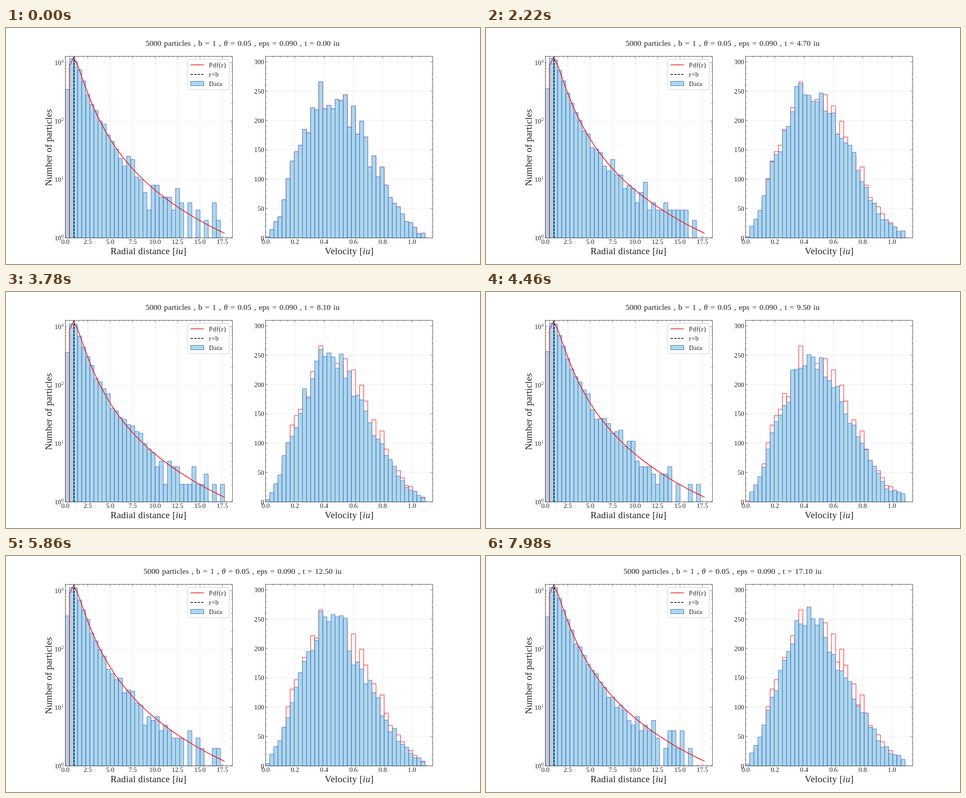
Animation of 1058 by 529 pixels, one loop 8000 ms. Source, as an HTML page:

```html
<!DOCTYPE html>
<html lang="en">
<head>
<meta charset="utf-8">
<title>Particle histograms</title>
<style>
  html, body { margin: 0; width: 100%; height: 100%; overflow: hidden; background: #fff; }
  svg { display: block; width: 100vw; height: 100vh; }
  text { font-family: "Liberation Serif", serif; font-size: 14.6px; fill: #222; }
  .mid { text-anchor: middle; }
  .end { text-anchor: end; }
  .title { font-size: 17.6px; word-spacing: 1.8px; }
  .label { font-size: 21px; letter-spacing: .25px; }
  .key { letter-spacing: .6px; }
  .sup { font-size: 10.2px; }
  .it { font-style: italic; }
  path, rect { fill: none; }
  .grid { stroke: #000; stroke-opacity: .1; stroke-width: .8; }
  .tick { stroke: #000; stroke-width: .6; }
  .spine { stroke: #000; stroke-width: .7; }
  .bars { fill: #add8e6; stroke: #4169e1; }
  .start { stroke: #f00; }
  .pdf { stroke: #f00; stroke-width: 1.5; stroke-linejoin: round; }
  .dash { stroke: #000; stroke-width: 1.6; stroke-dasharray: 5.5 2.4; }
  .box { fill: #fff; fill-opacity: .8; stroke: #ccc; }
</style>
</head>
<body>
<svg id="stage" viewBox="0 0 1058 529"></svg>
<script>
const stage = document.getElementById('stage');
const LOOP = 8000, BINS = 39, COUNT = 5000;
const TOP = 63.5, BASE = 470.5, WIDTH = 373;
const LEFT = 132.5, RIGHT = 579.5;
const R_PX = 20.03, V_PX = 326.7, DECADE = 130.9, N_PX = 1.315;
const R_BIN = 17.74 / BINS, V_BIN = 1.089 / BINS;

const startR = [350, 1180, 1040, 760, 485, 285, 192, 152, 101, 89, 58, 45, 33,
  23, 17, 25, 22, 11, 10, 6, 3, 8, 8, 5, 5, 5, 3, 7, 4, 0, 4, 0, 3, 0, 2, 0, 4, 2, 0];
const startV = [2, 14, 28, 36, 65, 101, 131, 147, 158, 185, 179, 222, 218, 266,
  220, 226, 220, 236, 234, 244, 189, 225, 177, 199, 172, 121, 140, 104, 121, 90,
  69, 59, 53, 41, 28, 26, 18, 7, 8];
// Settled velocity distribution, one point every three bins
const settledV = [2, 45, 117, 177, 233, 250, 237, 194, 155, 107, 69, 37, 17, 7];

function add(tag, attrs, html = '') {
  const el = document.createElementNS('http://www.w3.org/2000/svg', tag);
  for (const k in attrs) el.setAttribute(k, attrs[k]);
  el.innerHTML = html;
  return stage.appendChild(el);
}
const path = (cls, d = '') => add('path', { class: cls, d });
const text = (cls, x, y, html) => add('text', { class: cls, x, y }, html);

const logY = n => BASE - DECADE * Math.log10(Math.max(n, 1));
const linY = n => BASE - N_PX * n;

// Plummer sphere with b = 1
const inside = r => r ** 3 / (1 + r * r) ** 1.5;
const density = r => 3 * COUNT * .45 * r * r * (1 + r * r) ** -2.5;

const meanR = startR.map((_, i) => COUNT * (inside((i + 1) * R_BIN) - inside(i * R_BIN)));
const meanV = startV.map((_, i) => {
  const k = Math.floor(i / 3), f = i % 3 / 3;
  return settledV[k] * (1 - f) + settledV[k + 1] * f;
});

function random(a, b, c) {
  let h = Math.imul(a + 11, 374761393) ^ Math.imul(b + 7, 668265263) ^ Math.imul(c + 3, 2246822519);
  h = Math.imul(h ^ h >>> 15, 2246822507);
  h = Math.imul(h ^ h >>> 13, 3266489909);
  return ((h ^ h >>> 16) >>> 0) / 4294967296;
}
const gauss = (a, b, c) =>
  2 * (random(a, b, c) + random(a, b, c + 5000) + random(a, b, c + 9000) - 1.5);

// Counts wander around the mean with nearly Poisson-sized deviations
function counts(start, mean, seed, step) {
  if (step === 0) return start;
  const span = 9, k = Math.floor(step / span), f = step / span - k;
  return mean.map((m, i) => {
    const s = Math.sqrt(m);
    const knot = j => j ? .8 * gauss(seed, i, j) : (start[i] - m) / s;
    const z = (knot(k) * (1 - f) + knot(k + 1) * f) / Math.hypot(f, 1 - f);
    return Math.max(0, Math.round(m + s * (z + .15 * gauss(seed + 50, i, step))));
  });
}

function bars(x0, width, data, yOf) {
  return data.map((n, i) =>
    n ? `M${x0 + i * width} ${BASE}V${yOf(n)}h${width}V${BASE}Z` : '').join('');
}

const tickLength = big => big ? 4.5 : 2.3;

function ticksX(x0, px, minor, perMajor) {
  let grid = '', tick = '';
  for (let i = 0; i * minor * px <= WIDTH; i++) {
    const x = x0 + i * minor * px, big = i % perMajor === 0, len = tickLength(big);
    tick += `M${x} ${BASE}v${-len}M${x} ${TOP}v${len}`;
    if (big) {
      grid += `M${x} ${TOP}V${BASE}`;
      text('mid', x, 484, (i * minor).toFixed(1));
    }
  }
  path('grid', grid);
  path('tick', tick);
}

function ticksY(x0, marks) {
  let grid = '', tick = '';
  for (const [y, big] of marks) {
    if (y < TOP) continue;
    const len = tickLength(big);
    tick += `M${x0} ${y}h${len}M${x0 + WIDTH} ${y}h${-len}`;
    if (big) grid += `M${x0} ${y}h${WIDTH}`;
  }
  path('grid', grid);
  path('tick', tick);
}

// Axes
ticksX(LEFT, R_PX, .5, 5);
ticksX(RIGHT, V_PX, .05, 4);

const logMarks = [];
for (let d = 0; d < 4; d++) {
  for (let m = 1; m < 10; m++) logMarks.push([logY(m * 10 ** d), m === 1]);
  const y = logY(10 ** d);
  text('end', 123, y + 5, '10');
  text('sup', 123.4, y - .3, d);
}
ticksY(LEFT, logMarks);

const linMarks = [];
for (let n = 0; n <= 300; n += 10) {
  const big = n % 50 === 0;
  linMarks.push([linY(n), big]);
  if (big) text('end', 576, linY(n) + 5, n);
}
ticksY(RIGHT, linMarks);

// Data
const barsR = path('bars');
path('start', bars(RIGHT, V_BIN * V_PX, startV, linY));
const barsV = path('bars');

let curve = `M${LEFT + R_BIN * R_PX} ${BASE}`;
for (let i = 1; i <= BINS; i++) curve += `L${LEFT + i * R_BIN * R_PX} ${logY(density(i * R_BIN))}`;
path('pdf', curve);
path('dash', `M152.2 ${BASE}V${TOP}`);

for (const x of [LEFT, RIGHT]) add('rect', { class: 'spine', x, y: TOP, width: WIDTH, height: BASE - TOP });

// Legend
add('rect', { class: 'box', x: 405.5, y: 70.5, width: 92.5, height: 67.5, rx: 2.5 });
path('pdf', 'M412 82.5h29.5');
path('dash', 'M412 104h29.5');
add('rect', { class: 'bars', x: 412.5, y: 119.5, width: 29, height: 10 });
['Pdf(r)', 'r=b', 'Data'].forEach((s, i) => text('key', 453, 88 + 21 * i, s));

// Labels
const unit = '[<tspan class="it">iu</tspan>]';
text('label mid', 318, 507, 'Radial distance ' + unit);
text('label mid', 766, 507, 'Velocity ' + unit);
text('label mid', 0, 0, 'Number of particles').setAttribute('transform', 'translate(102 268) rotate(-90)');
const title = text('title mid', 528, 39.5, '');

// Three steps every 140 ms, held for 20, 20 and 100 ms
function stepAt(ms) {
  const u = ms - 120, k = Math.floor(u / 140);
  return 2 + 3 * k + Math.min(2, Math.floor((u - 140 * k) / 20));
}

let shown = -1;
function show(step) {
  if (step === shown) return;
  shown = step;
  title.innerHTML = '5000 particles , b = 1 , <tspan class="it">θ</tspan> = 0.05 , eps = 0.090 , t = '
    + (step / 10).toFixed(2) + ' iu';
  barsR.setAttribute('d', bars(LEFT, R_BIN * R_PX, counts(startR, meanR, 1, step), logY));
  barsV.setAttribute('d', bars(RIGHT, V_BIN * V_PX, counts(startV, meanV, 2, step), linY));
}

show(0);
const t0 = performance.now();
(function tick() {
  show(stepAt((performance.now() - t0) % LOOP));
  requestAnimationFrame(tick);
})();
</script>
</body>
</html>
```
